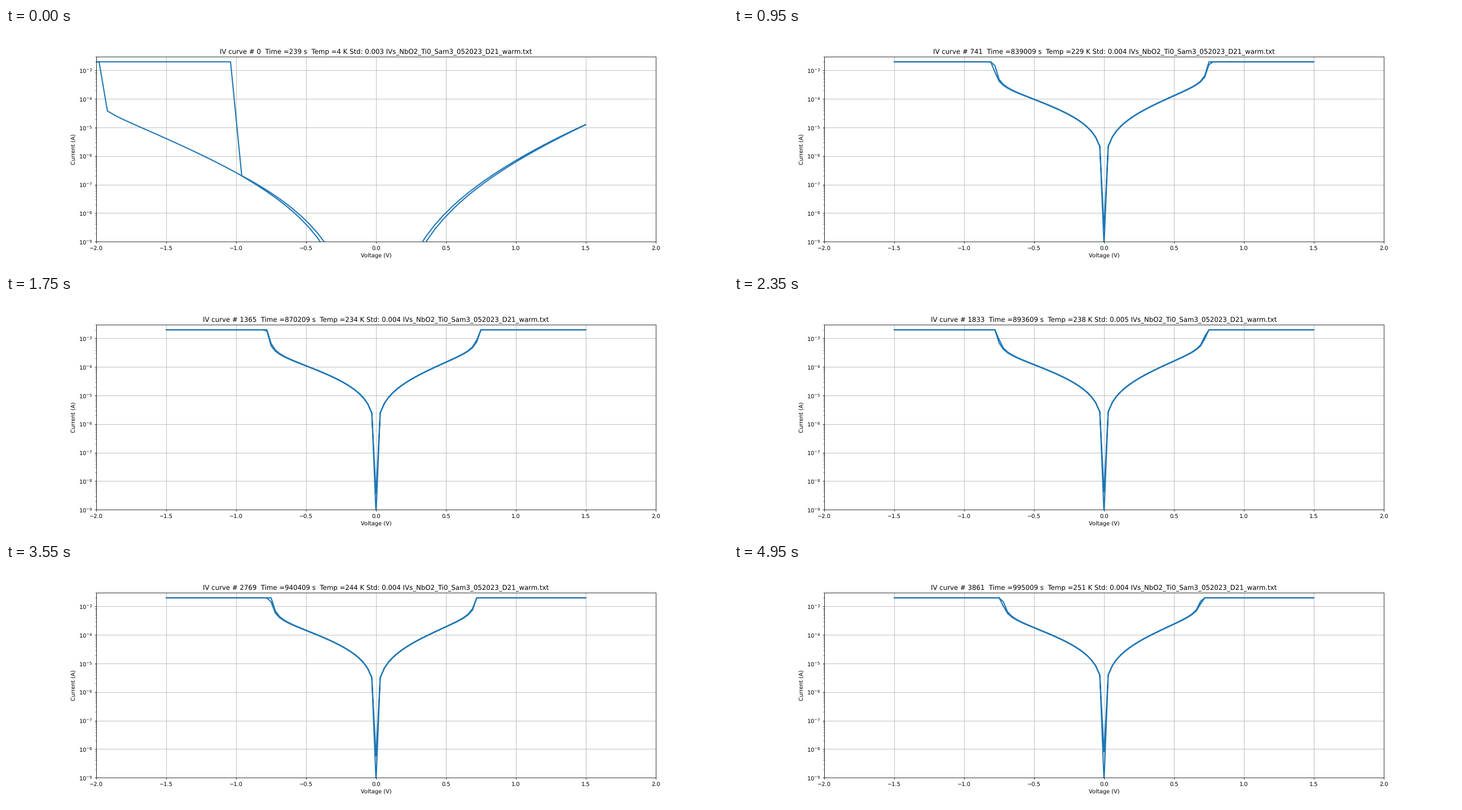
A matplotlib script that plays this animation: 1280 px wide and 427 px high, repeating every 5 s.

```python
import numpy as np
import matplotlib.pyplot as plt
from matplotlib.animation import FuncAnimation

W, H, DPI = 1280, 427, 1280 / 18
FRAMES, INTERVAL = 100, 50
STRIDE = 39            # curves skipped between two frames
LIMIT = 2e-3           # compliance current, A
FILE = "IVs_NbO2_Ti0_Sam3_052023_D21_warm.txt"

plt.rcParams["text.hinting"] = "none"


def log_fit(points, degree):
    """Smooth log10(I) as a polynomial in ln|V|."""
    v, logi = np.array(points).T
    coef = np.polyfit(np.log(v), logi, degree)
    return lambda x: np.polyval(coef, np.log(x))


cold_pos = log_fit([(.345, -9), (.508, -8), (.75, -7), (1.06, -6),
                    (1.5, -4.9)], 3)
cold_base = log_fit([(.385, -9), (.57, -8), (.7, -7.5), (.96, -6.695),
                     (1.3, -5.83), (1.5, -5.395), (1.74, -4.88),
                     (1.92, -4.5)], 4)


def cold_neg(v):
    """Negative side, curling up just before it switches."""
    return cold_base(v) + 0.08 * np.exp((v - 1.92) / 0.07)


def cold_sweep():
    pos = np.arange(4, 26) * 0.06
    neg = np.arange(4, 33) * 0.06
    near = neg[neg < 0.97]
    dp = 0.013 * np.sqrt((1.5 - pos) / 1.12)
    dn = 0.014 * np.sqrt(np.clip((0.96 - neg) / 0.58, 0, None))
    dn_near = dn[:len(near)]
    v = np.concatenate([pos, pos[::-1], [np.nan], -near, [-1.04, -2.3],
                        [np.nan], [-2.3, -1.98], -neg[::-1]])
    i = np.concatenate([10 ** cold_pos(pos + dp),
                        10 ** cold_pos(pos - dp)[::-1], [np.nan],
                        10 ** cold_neg(near + dn_near), [LIMIT, LIMIT],
                        [np.nan], [LIMIT, LIMIT],
                        10 ** cold_neg(neg - dn)[::-1]])
    return v, i


def branch(v, g, slope, a, v0):
    """Conduction that runs away as v nears the threshold v0."""
    gap = np.maximum(v0 - v, 1e-3)
    return np.minimum(g * v * np.exp(slope * v + a / gap), LIMIT)


def warm_sweep(n):
    x = n - 741
    g = 6.4e-5 * np.exp(1.88e-4 * x)
    vp = 0.775 - 0.045 * x / 3120
    vn = 0.815 - 0.053 * x / 3120
    high, low = 3e-9 * np.exp(3.14e-4 * x), 7e-10
    v = np.arange(1, 51) * 0.03
    p_up = branch(v, 0.985 * g, 2.5, 0.041, vp)
    p_down = branch(v, 1.015 * g, 2.5, 0.041, vp - 0.006)
    n_up = branch(v, 0.985 * g, 1.9, 0.049, vn)
    n_down = branch(v, 1.015 * g, 1.9, 0.049, vn - 0.009)
    volts = np.concatenate([[0], v, v[::-1], [0], -v, -v[::-1], [0]])
    amps = np.concatenate([[low], p_up, p_down[::-1], [high],
                           n_up, n_down[::-1], [low]])
    return volts, amps


def readings(k):
    n = k * STRIDE
    if k == 0:
        return n, 239, 4, 0.003
    x = n - 741
    temp = 229.4 + 0.0078 * x - 2.4e-7 * x * x
    return n, 801959 + 50 * n, round(temp), 0.005 if k % 9 == 2 else 0.004


fig, ax = plt.subplots(figsize=((W + 1e-6) / DPI, (H + 1e-6) / DPI), dpi=DPI)
line, = ax.plot([], [], color="C0", lw=2.1)
ax.set_yscale("log")
ax.set_xlim(-2, 2)
ax.set_ylim(1e-9, 3e-3)
ax.set_xlabel("Voltage (V)")
ax.set_ylabel("Current (A)")
ax.grid(True)
title = ax.set_title("", fontsize=11.93)


def update(k):
    n, secs, temp, std = readings(k)
    line.set_data(*(warm_sweep(n) if k else cold_sweep()))
    title.set_text(f"IV curve # {n}  Time ={secs} s  Temp ={temp} K "
                   f"Std: {std:.3f} {FILE}")
    return line, title


anim = FuncAnimation(fig, update, frames=FRAMES, interval=INTERVAL,
                     repeat=True, repeat_delay=0, blit=False)
plt.show()
```
